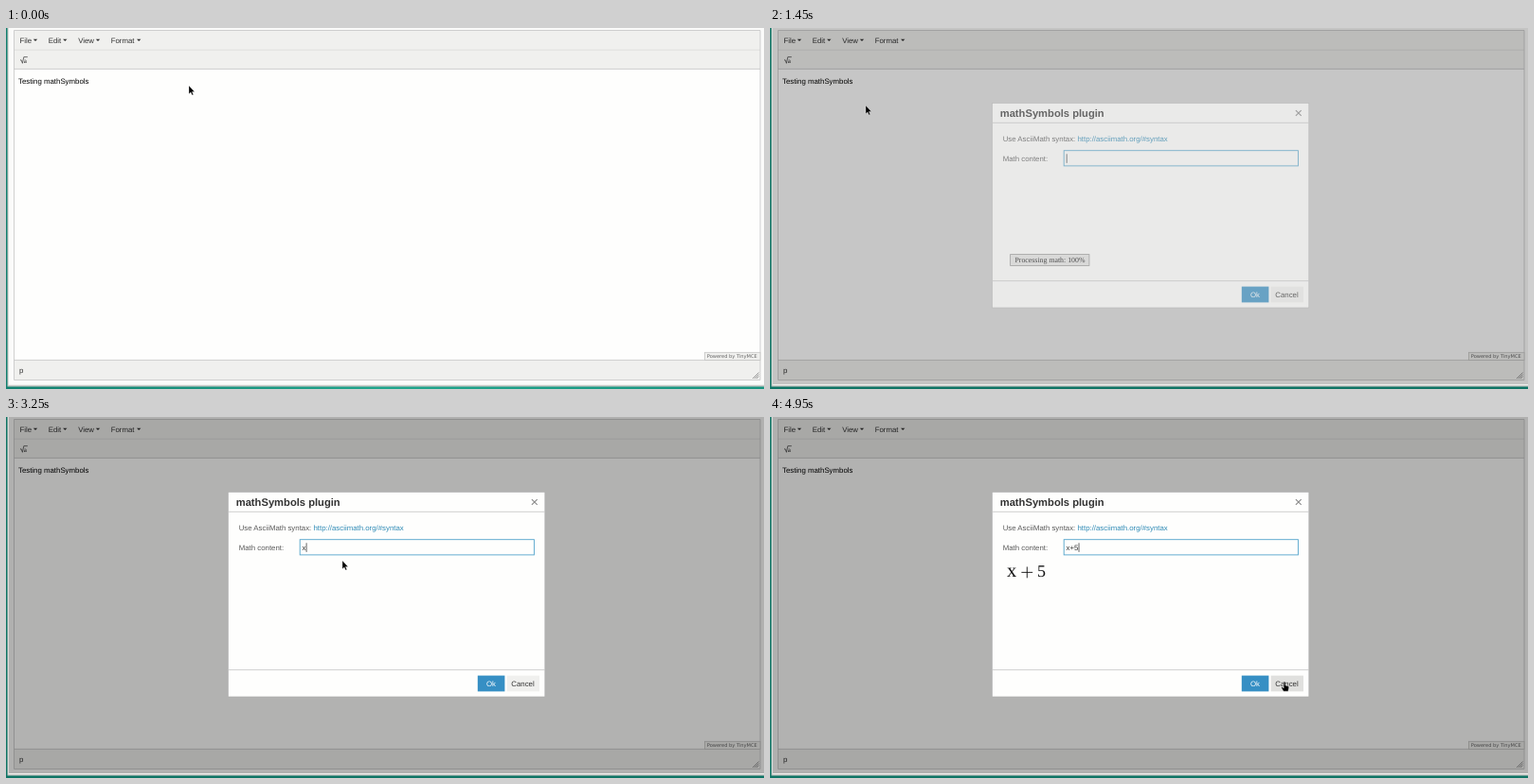
An HTML page that plays this animation: 800x382 px, repeating every 5 s.

```html
<!DOCTYPE html>
<html lang="en">
<head>
<meta charset="utf-8">
<title>mathSymbols plugin</title>
<style>
  html, body { margin: 0; width: 100%; height: 100%; overflow: hidden; background: #fefefd; }
  svg { display: block; width: 100%; height: 100%; cursor: default; }
  text { font: 7.84px "Liberation Sans", Arial, sans-serif; fill: #333; text-rendering: geometricPrecision; white-space: pre; }
  .title { font-size: 11.2px; font-weight: bold; }
  .label { fill: #595959; }
  .link { fill: #2e8ab5; }
  .mid { text-anchor: middle; }
  .serif { font-family: "Liberation Serif", Times, serif; fill: #111; }
  .badge { font: 5.1px "DejaVu Sans", sans-serif; fill: #666; }
  .line { fill: none; stroke: #c5c5c4; stroke-width: .8; }
  .bar { fill: #f0f0ee; }
</style>
</head>
<body>
<svg viewBox="0 0 800 382">
  <defs>
    <linearGradient id="desk">
      <stop offset="0" stop-color="#12806f"/>
      <stop offset=".5" stop-color="#1fa58c"/>
      <stop offset="1" stop-color="#17947f"/>
    </linearGradient>
  </defs>

  <!-- desktop and browser frame -->
  <rect id="desktop" width="800" height="382"/>
  <rect x="1.5" width="799" height="379.5" fill="#c9c9c7"/>
  <rect x="2.5" width="798" height="378" fill="#f0f0ee"/>
  <rect x="3" width="797" height="377" fill="#fbfbfa"/>

  <!-- editor -->
  <rect x="8.5" y="2.5" width="787.5" height="370" fill="#fefefd"/>
  <rect class="bar" x="8.5" y="2.5" width="787.5" height="41"/>
  <rect class="bar" x="8.5" y="351.5" width="787.5" height="21"/>
  <path class="line" d="M8.5 23.2H796" style="stroke:#dcdcda"/>
  <rect id="toolHover" x="8.9" y="24.5" width="19.6" height="18.6" fill="#dcdcda" stroke="#c8c8c6" stroke-width=".6"/>
  <path class="line" d="M8.5 2.5H796V372.5H8.5ZM8.5 43.4H796M8.5 351.4H796"/>
  <g id="menus"></g>
  <path d="M15 34.2l1-.5 1.4 3.6 1.4-6.6h4" fill="none" stroke="#333" stroke-width=".7"/>
  <text class="serif" x="18.7" y="37" font-style="italic" style="font-size:7px">a</text>
  <text x="13" y="59.2" style="fill:#000">Testing mathSymbols</text>
  <text x="14" y="364.8">p</text>
  <rect class="bar" x="737.5" y="343.3" width="58.5" height="8.1" stroke="#c5c5c4" stroke-width=".8"/>
  <text class="badge" x="739.8" y="349.2">Powered by TinyMCE</text>
  <path d="M788 371l6.5-6.5M790 371l4.5-4.5M792 371l2.5-2.5" stroke="#999" stroke-width="1"/>

  <rect id="overlay" x="3" width="797" height="377"/>

  <g id="dialog">
    <rect x="234.5" y="79.5" width="334.3" height="216.5" fill="#fefefd" stroke="#b0b0af" stroke-width=".6"/>
    <text class="title" x="242.7" y="93.8">mathSymbols plugin</text>
    <path d="M554.9 87.1l5.8 5.8m0-5.8l-5.8 5.8" stroke="#8c8c8c" stroke-width="1.2"/>
    <path class="line" d="M234.5 100.3H568.8M234.5 267.6H568.8"/>
    <text class="label" x="245.7" y="119.6">Use AsciiMath syntax: <tspan class="link">http://asciimath.org/#syntax</tspan></text>
    <text class="label" x="245.7" y="140.7">Math content:</text>
    <rect x="310.2" y="129.7" width="247.2" height="16.2" fill="#fefefd" stroke="#52a3cb" stroke-width=".9"/>
    <text id="input" x="312.6" y="140.7"></text>
    <path id="caret" d="M313.2 133.3v9.6" stroke="#222" stroke-width=".7"/>
    <g id="preview">
      <text id="mathX" class="serif" x="250" y="169" font-style="italic" style="font-size:20.5px">x</text>
      <path id="mathPlus" d="M265.4 164.4h11.8M271.3 158.5v11.8" stroke="#111" stroke-width=".9"/>
      <text id="math5" class="serif" x="282" y="169" style="font-size:18px">5</text>
    </g>
    <g id="message">
      <rect id="messageBox" x="253.6" y="239.6" height="11.8" fill="#e4e4e3" stroke="#8f8f8f" stroke-width=".8"/>
      <text id="messageText" class="serif" x="258.5" y="248"></text>
    </g>
    <rect x="497.8" y="273.6" width="28.6" height="16.8" fill="#368fc4"/>
    <text class="mid" x="512" y="284.8" style="fill:#fff">Ok</text>
    <rect id="cancel" x="528.6" y="273.6" width="34.4" height="16.8"/>
    <text class="mid" x="545.5" y="284.8">Cancel</text>
  </g>

  <g id="pointer" stroke="#fff" stroke-opacity=".6" stroke-width=".5" stroke-linejoin="round">
    <path id="arrow" d="M0 0V8.8L2 7.1L3.4 10L4.8 9.4L3.4 6.6L6 6.4Z"/>
    <path id="hand" d="M-.8 .4Q0-.6 .8 .4V4L4 4.9Q4.8 5.2 4.6 6.4L3.8 10.2H-1L-3.2 6.6Q-3.2 5.5-2.2 5.8L-.8 7Z"/>
  </g>
</svg>
<script>
const DURATION = 5000, TICK = 50;
const $ = id => document.getElementById(id);
const show = (id, on) => $(id).style.display = on ? '' : 'none';

// Pointer tip: time, x, y
const path = [
  [0, 193, 61], [150, 110, 37], [250, 60, 51], [350, 60, 51], [500, 2, 38],
  [650, 18, 35], [750, 18, 35], [850, 53, 87], [950, 19, 35], [1300, 20, 36],
  [1400, 30, 42], [1450, 101, 82], [1500, 101, 82], [1550, 146, 119],
  [1750, 275, 189], [2050, 367, 157], [2150, 367, 157], [2450, 355, 152],
  [4200, 355, 152], [4350, 253, 200], [4600, 767, 230], [4750, 628, 267], [4950, 543, 280]
];
const typed = [[0, ''], [3250, 'x'], [3600, 'x+'], [3700, 'x+5']];
const rendered = [[0, 0], [3300, 1], [3700, 2], [3800, 3]];
const typesetting = 'Typesetting math: 100%';
const messages = [
  [0, ''], [1450, 'Processing math: 100%'],
  [1550, 'Loading [MathJax]/jax/output/CommonHTML/fonts/TeX/fontdata.js'],
  [1650, typesetting], [1750, ''], [3300, typesetting], [3450, ''],
  [3650, typesetting], [4000, '']
];
// Overlay opacity, dialog opacity, dialog scale
const opening = [[0, [0, 0, 1]], [1400, [.06, .06, .24]], [1450, [.22, .65, 1]], [1550, [.3, 1, 1]]];

const menus = [['File', 14.4, 31], ['Edit', 44.8, 62.3], ['View', 76.2, 97], ['Format', 110.7, 140.2]];
$('menus').innerHTML = menus.map(([name, x, arrow]) =>
  `<text x="${x}" y="15.6">${name}</text><path d="M${arrow - 2.2} 11.8h4.4l-2.2 2.3z" fill="#333"/>`).join('');

const stepAt = (steps, t) => steps.findLast(([start]) => start <= t)[1];

function pointAt(t) {
  const next = path.findIndex(([time]) => time > t);
  if (next < 0) return path.at(-1).slice(1);
  const [t0, x0, y0] = path[next - 1], [t1, x1, y1] = path[next];
  const k = (t - t0) / (t1 - t0);
  return [x0 + (x1 - x0) * k, y0 + (y1 - y0) * k];
}

const inside = ([x, y], left, top, right, bottom) => x >= left && x <= right && y >= top && y <= bottom;

function setText(id, value) {
  const node = $(id);
  if (node.textContent !== value) node.textContent = value;
  return value ? node.getComputedTextLength() : 0;
}

function draw(t) {
  const [shade, opacity, scale] = stepAt(opening, t);
  $('desktop').setAttribute('fill', t < TICK ? 'url(#desk)' : '#0d7464');
  $('overlay').setAttribute('opacity', shade);
  show('dialog', opacity > 0);
  $('dialog').setAttribute('opacity', opacity);
  $('dialog').setAttribute('transform', `translate(401.7 187.8) scale(${scale}) translate(-401.7 -187.8)`);

  const caretX = setText('input', stepAt(typed, t));
  $('caret').setAttribute('transform', `translate(${caretX})`);

  const symbols = stepAt(rendered, t);
  ['mathX', 'mathPlus', 'math5'].forEach((id, i) => show(id, symbols > i));
  $('preview').setAttribute('transform', `translate(0 ${symbols < 3 ? -1.4 : 0})`);

  const message = stepAt(messages, t);
  show('message', message);
  $('messageBox').setAttribute('width', setText('messageText', message) + 9.4);

  const point = pointAt(t);
  const onTool = t < 1400 && inside(point, 8.5, 24, 28.5, 43);
  const onCancel = inside(point, 528.6, 273.6, 563, 290.4);
  show('toolHover', t >= 450 && t < 1450);
  $('cancel').setAttribute('fill', onCancel ? '#e0e0de' : '#f0f0ee');
  show('hand', onTool || onCancel);
  show('arrow', !(onTool || onCancel));
  $('pointer').setAttribute('transform', `translate(${point})`);
}

function frame() {
  const t = performance.now() % DURATION;
  draw(Math.floor(t / TICK) * TICK);
  requestAnimationFrame(frame);
}
frame();
</script>
</body>
</html>
```
